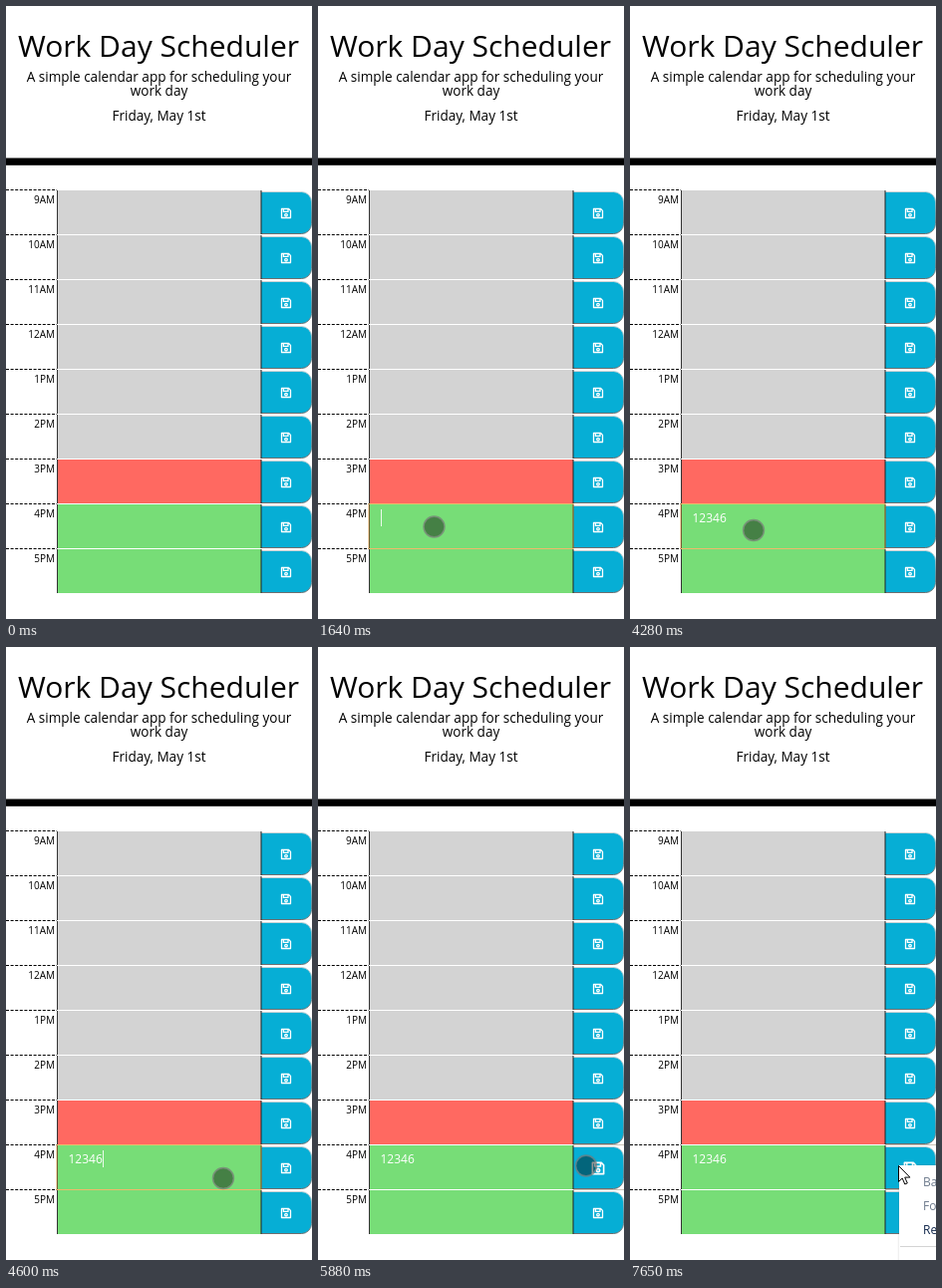
These frames come from a looping animation (307x615 px, 8000 ms). An HTML page:

```html
<!DOCTYPE html>
<html lang="en">
<head>
<meta charset="utf-8">
<title>Work Day Scheduler</title>
<style>
html, body { margin: 0; width: 100%; height: 100%; overflow: hidden; background: #fff; }
svg { display: block; width: 307px; height: 615px; font-family: "Open Sans", sans-serif; }
.mid { text-anchor: middle; }
.lead { font-size: 13.55px; }
.hour { font-size: 10px; text-anchor: end; }
.item { font-size: 12px; }
.icon { fill: none; stroke: #fff; stroke-width: 1.3; stroke-linejoin: round; }
</style>
</head>
<body>
<svg viewBox="0 0 307 615">
  <defs>
    <linearGradient id="edge" x1="0" y1="0" x2="0" y2="1">
      <stop offset="0" stop-color="#c9d3d6"/>
      <stop offset=".5" stop-color="#5f9fb0"/>
      <stop offset="1" stop-color="#6f6f6f"/>
    </linearGradient>
    <filter id="shade" x="-30%" y="-30%" width="160%" height="160%">
      <feDropShadow dx="1" dy="1" stdDeviation="1.5" flood-opacity=".4"/>
    </filter>
  </defs>
  <rect width="307" height="615" fill="#fff"/>
  <text class="mid" x="153" y="51" font-size="30">Work Day Scheduler</text>
  <g class="mid lead">
    <text x="153.5" y="76">A simple calendar app for scheduling your</text>
    <text x="153.5" y="90">work day</text>
    <text x="153.5" y="115">Friday, May 1st</text>
  </g>
  <rect y="152.5" width="307" height="7.3"/>
  <g id="rows"></g>
  <rect id="focus" x="51" y="499.5" width="205" height="45" fill="none" stroke="#e8a33a" stroke-opacity=".75"/>
  <text id="entry" x="62.5" y="518" font-size="12" fill="#fff"></text>
  <rect id="caret" y="505" width="1" height="17" fill="#fff" fill-opacity=".85"/>
  <path id="btnFocus" d="M256 499.5H307M256 544.5H307" stroke="#a89c88" stroke-opacity=".6"/>
  <g id="touch">
    <circle id="dot" r="10"/>
    <circle r="10.4" fill="none" stroke="#777" stroke-opacity=".7" stroke-width="1.6"/>
  </g>
  <g id="menu">
    <rect x="270" y="520" width="60" height="120" fill="#fff" filter="url(#shade)"/>
    <g class="item">
      <text x="294" y="541" fill="#6d7a8c">Back</text>
      <text x="294" y="565" fill="#6d7a8c">Forward</text>
      <text x="294" y="589" fill="#10264a">Reload</text>
    </g>
    <path d="M271 601.5H307" stroke="#d4d4d4"/>
    <path d="M269.5 520.5v16l3.7-3.5 2.6 6 2.5-1.1-2.6-5.8h5.2Z" fill="#fff" stroke="#000"/>
  </g>
</svg>
<script>
const LOOP = 8000, STEP = 78.3, PITCH = 45, TOP = 185;
const HOURS = ["9AM", "10AM", "11AM", "12AM", "1PM", "2PM", "3PM", "4PM", "5PM"];
const $ = id => document.getElementById(id);

function row(label, i) {
  const y = TOP + PITCH * i;
  const color = i < 6 ? "#d3d3d3" : i === 6 ? "#ff6961" : "#77dd77";
  return `<path d="M0 ${y - .5}H51" stroke="#000" stroke-dasharray="3 1.6"/>
    <text class="hour" x="49" y="${y + 13}">${label}</text>
    <rect x="51" y="${y}" width="205" height="44" fill="${color}"/>
    <path d="M51.5 ${y}v44" stroke="#333"/>
    <path d="M256 ${y + 1.5}h40.5a10 10 0 0 1 10 10v22a10 10 0 0 1 -10 10h-40.5" fill="#06aed5" stroke="url(#edge)"/>
    <path d="M256 ${y}v44" stroke="#222"/>
    <g class="icon" transform="translate(281 ${y + 23})"><g id="icon${i}">
      <path d="M-4.5-4.5H2.6L4.5-2.6V4.5H-4.5ZM-2.6-4.3V-1.6H2V-4.3"/>
      <circle cy="1.6" r="1.3"/></g></g>`;
}
$("rows").innerHTML = HOURS.map(row).join("");

// Path towards the save button: [step, x, y]
const PATH = [[0, 124, 526], [2, 162, 537], [3, 191, 539.5], [4, 218, 533], [5, 245, 528.5],
  [6, 266, 525], [7, 279.5, 523.5], [8, 279.5, 523.5], [9, 277, 522.5], [11, 269, 520.5]];
const KEYS = [[3020, "1"], [3100, "12"], [3180, "123"], [3420, "1234"], [3580, "12346"]];
const CARET = [[1550, 2100], [2640, 4120], [4600, 5160]];
const PRESS = [[1240, 1550], [5320, 5470], [6950, 7650]];

const within = (t, spans) => spans.some(([a, b]) => t >= a && t < b);
const show = (id, on) => $(id).setAttribute("visibility", on ? "visible" : "hidden");

function along(k) {
  const n = PATH.findIndex(p => p[0] >= k);
  if (n < 0) return PATH[PATH.length - 1].slice(1);
  if (n === 0) return PATH[0].slice(1);
  const a = PATH[n - 1], b = PATH[n], u = (k - a[0]) / (b[0] - a[0]);
  return [a[1] + (b[1] - a[1]) * u, a[2] + (b[2] - a[2]) * u];
}

function touchAt(t) {
  if (t >= 4280) return along(Math.floor((t - 4280) / STEP));
  if (t >= 1240) return [116.5, 522.5];
  const left = 1 - Math.min(8, Math.floor((t - 380) / STEP)) / 8;
  return [117 + 116.5 * left ** 2.63, 524.5 + 86 * left ** 2.3];
}

function draw(t) {
  const typed = KEYS.reduce((s, [at, text]) => t >= at ? text : s, "");
  const entry = $("entry");
  if (entry.textContent !== typed) entry.textContent = typed;
  $("caret").setAttribute("x", Math.round(62.5 + (typed ? entry.getComputedTextLength() : 0)));
  show("caret", within(t, CARET));
  show("focus", t >= 1550 && t < 5470);
  show("btnFocus", t >= 5470);

  const moving = t >= 380 && t < 7650;
  show("touch", moving);
  if (moving) $("touch").setAttribute("transform", `translate(${touchAt(t).join(" ")})`);
  $("dot").setAttribute("fill-opacity", within(t, PRESS) ? .55 : .42);

  const u = Math.max(0, Math.min(1, (t - 5470) / 380));
  $("icon7").setAttribute("transform", `scale(${1 + .25 * u * u * (3 - 2 * u)})`);
  show("menu", t >= 7650);
}

const start = performance.now();
function tick() {
  draw((performance.now() - start) % LOOP);
  requestAnimationFrame(tick);
}
draw(0);
tick();
</script>
</body>
</html>
```
